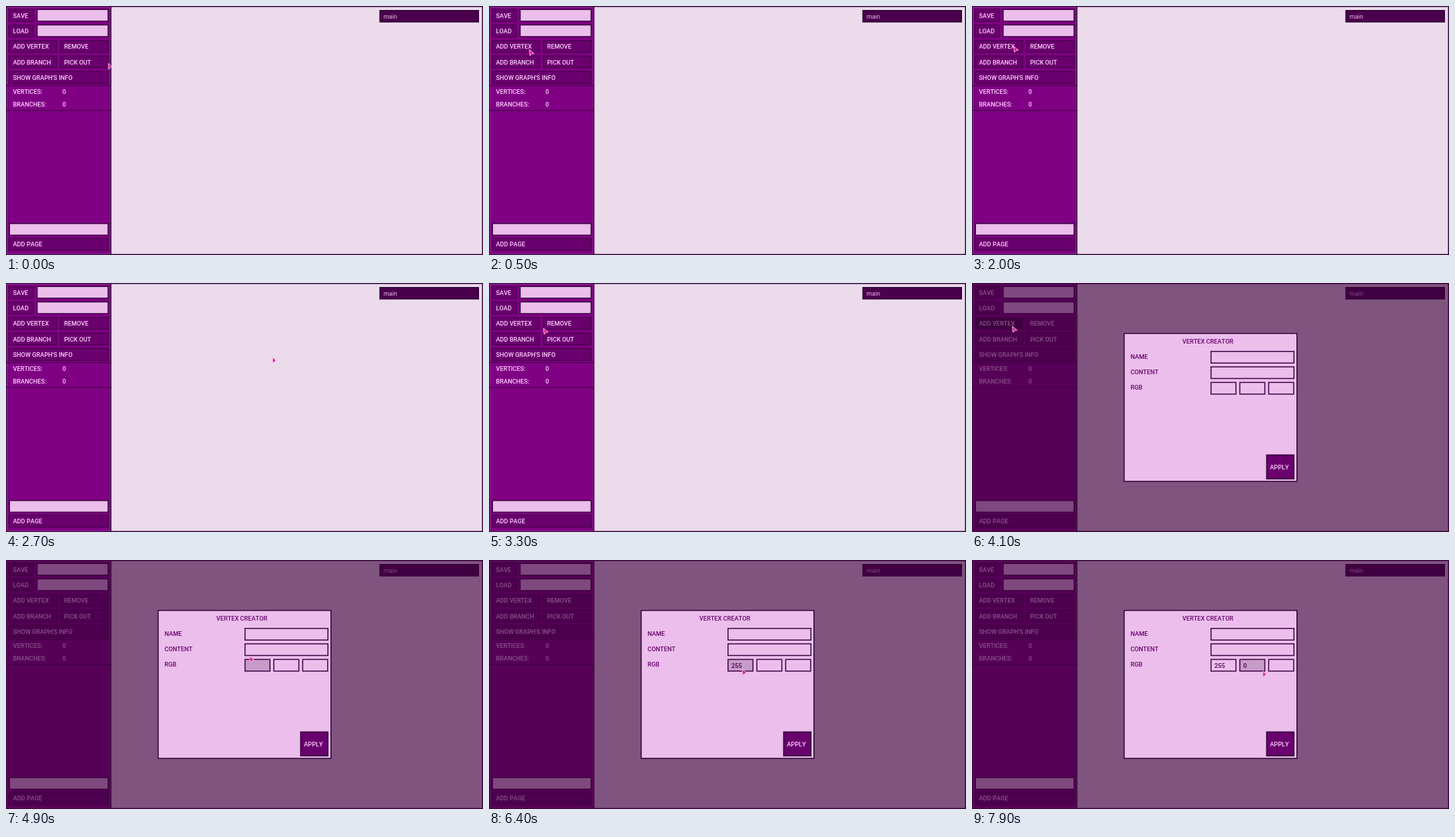
Animation, 716 px wide and 374 px high, one loop 8 s. Source, as an HTML page with a canvas:

```html
<!DOCTYPE html>
<html lang="en">
<head>
<meta charset="utf-8">
<title>Graph editor</title>
<style>
html, body { margin: 0; width: 100%; height: 100%; overflow: hidden; background: #ebdbeb; }
canvas { display: block; }
</style>
</head>
<body>
<canvas id="stage" width="716" height="374"></canvas>
<script>
const ctx = document.getElementById('stage').getContext('2d');
const LOOP = 8000, STEP = 100;
const DARK = '#2e0034', EDGE = '#3a0040', BUTTON = '#6a006e', BUTTON_EDGE = '#540058';
const PRESSED = '#430047', PURPLE = '#800084', PINK = '#ebbeeb', LABEL = '#ffd0ff';
const row = i => 4.5 + 23.2 * i;

// Each glide eases the pointer from where it rests to a new place
const GLIDES = [
  { at: 0, lasts: 200, x: 52, y: 344 },
  { at: 200, lasts: 300, x: 60, y: 65 },
  { at: 1700, lasts: 300, x: 62, y: 60 },
  { at: 2200, lasts: 200, x: 430, y: 316 },
  { at: 2400, lasts: 200, x: 550, y: 190 },
  { at: 2600, lasts: 100, x: 400, y: 111 },
  { at: 2700, lasts: 800, x: 60, y: 64.5 },
  { at: 4200, lasts: 700, x: 365, y: 144 },
  { at: 6200, lasts: 200, x: 379.5, y: 163.5 },
  { at: 6400, lasts: 300, x: 430, y: 163 },
  { at: 7600, lasts: 300, x: 436.5, y: 166.5 }
];

function panel(x, y, right, bottom, fill, edge, line = 1.5) {
  ctx.fillStyle = edge;
  ctx.fillRect(x, y, right - x, bottom - y);
  ctx.fillStyle = fill;
  ctx.fillRect(x + line, y + line, right - x - 2 * line, bottom - y - 2 * line);
}

function text(label, x, middle, color = LABEL, weight = 500) {
  ctx.font = `${weight} 9.2px Roboto, sans-serif`;
  ctx.fontKerning = 'none';
  ctx.fillStyle = color;
  ctx.fillText(label, x, middle + 3.4);
}

function button(label, x, y, right, fill = BUTTON) {
  panel(x, y, right, y + 19.7, fill, BUTTON_EDGE, 2);
  text(label, x + 6.5, y + 10.1);
}

function field(x, y, right, fill = PINK, value = '') {
  panel(x, y, right, y + 19, fill, EDGE);
  text(value, x + 6, y + 10, '#4a0050');
}

function drawEditor(pressed) {
  panel(0, 0, 716, 374, '#ebdbeb', DARK);
  ctx.fillStyle = PURPLE;
  ctx.fillRect(1.5, 1.5, 155, 371);
  ctx.fillStyle = DARK;
  ctx.fillRect(156.5, 0, 1.7, 374);
  ctx.fillStyle = '#4a0050';
  ctx.fillRect(1, 118.7, 156, 1.5);
  ctx.fillRect(1, 156, 156, 1.5);

  ['SAVE', 'LOAD'].forEach((label, i) => {
    button(label, 4, row(i), 42);
    field(46, row(i), 154);
  });
  button('ADD VERTEX', 4, row(2), 77, pressed ? PRESSED : BUTTON);
  button('REMOVE', 80.7, row(2), 154);
  button('ADD BRANCH', 4, row(3), 77);
  button('PICK OUT', 80.7, row(3), 154);
  button("SHOW GRAPH'S INFO", 4, row(4), 154);
  ['VERTICES:', 'BRANCHES:'].forEach((label, i) => {
    text(label, 10.5, 128.7 + 18.8 * i);
    text('0', 84.7, 128.7 + 18.8 * i);
  });
  field(4.5, 326, 154);
  button('ADD PAGE', 4, 347.8, 154);
  panel(560.5, 6, 710, 24.7, '#4b004d', DARK);
  text('main', 566.7, 16, PINK, 400);
}

function drawCreator(t) {
  ctx.fillStyle = 'rgba(60, 0, 60, .61)';
  ctx.fillRect(0, 0, 716, 374);
  panel(227.7, 75, 488.5, 298.7, PINK, DARK);
  text('VERTEX CREATOR', 315.8, 87.6, BUTTON);
  ['NAME', 'CONTENT', 'RGB'].forEach((label, i) => text(label, 238, 111 + 23 * i, BUTTON));
  field(358, 102, 484);
  field(358, 125.2, 484);

  const typed = Math.max(0, Math.floor((t - 5600) / 350) + 1);
  const values = ['255'.slice(0, typed), t >= 7700 ? '0' : '', ''];
  const active = t < 4900 ? -1 : t < 6700 ? 0 : 1;
  values.forEach((value, i) => {
    const x = 358 + 43.3 * i;
    field(x, 148.6, x + 39, i === active ? '#c79bc8' : PINK, value);
  });
  panel(441.5, 257.5, 484, 295, BUTTON, EDGE, 2);
  text('APPLY', 447.2, 276.8);
}

function pointerAt(t) {
  let x = 153.5, y = 85.5;
  for (const glide of GLIDES) {
    const k = Math.min(1, Math.max(0, (t - glide.at) / glide.lasts));
    const eased = k * (2 - k);
    x += (glide.x - x) * eased;
    y += (glide.y - y) * eased;
  }
  return { x, y };
}

function drawPointer(t) {
  const { x, y } = pointerAt(t);
  const clickable = x < 152 || (t >= 4100 && x > 358 && y < 166);
  const shape = clickable ? [[0.5, 0.5], [7.5, 6.3], [4.5, 7], [1.5, 9.5]]
                          : [[0.3, 0.5], [5, 5.5], [0.3, 9.3]];
  ctx.beginPath();
  shape.forEach(([dx, dy]) => ctx.lineTo(x + dx, y + dy));
  ctx.closePath();
  ctx.fillStyle = '#e0148c';
  ctx.fill();
  ctx.strokeStyle = '#f9c0ee';
  ctx.lineWidth = 1;
  ctx.stroke();
}

function frame(now) {
  const t = Math.floor(now % LOOP / STEP) * STEP;
  drawEditor(t >= 4000 && t < 4300);
  if (t >= 4100) drawCreator(t);
  drawPointer(t);
  requestAnimationFrame(frame);
}
requestAnimationFrame(frame);
</script>
</body>
</html>
```
